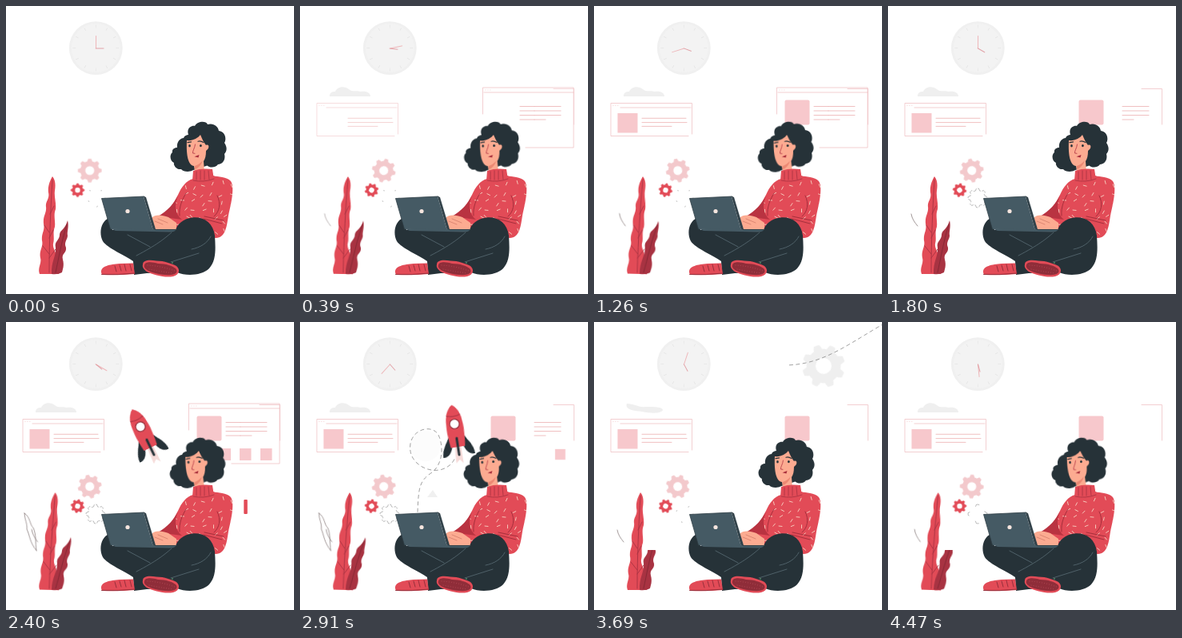
An HTML page that plays this animation: 360x360 px, repeating every 4500 ms.

```html
<!DOCTYPE html>
<html lang="en">
<head>
<meta charset="utf-8">
<title>Work in progress</title>
<style>
html, body { margin: 0; width: 100%; height: 100%; overflow: hidden; background: #fff; }
svg { display: block; width: 100vw; height: 100vh; }
:root { --red: #e24b57; --pink: #f7c8cc; --ink: #263238; --skin: #fcab91; --wine: #a83342; }
.anim { animation: 4500ms linear infinite; }
.line { fill: none; stroke-linecap: round; stroke-linejoin: round; }

/* clock */
.minute { animation-name: minute; }
.hour { animation-name: hour; }
.minute, .hour { transform-origin: 112.5px 53px; }
@keyframes minute { to { transform: rotate(900deg); } }
@keyframes hour { from { transform: rotate(90deg); } to { transform: rotate(165deg); } }

/* swaying parts share one beat */
.sway { animation-name: sway; animation-timing-function: cubic-bezier(.37, 0, .63, 1); }
@keyframes sway {
  0%, 40%, 80% { transform: rotate(0); }
  20%, 60%, 100% { transform: rotate(var(--tilt)); }
}
.head { --tilt: -3.4deg; transform-origin: 242px 208px; }
.tall { --tilt: 2.2deg; transform-origin: 56px 335px; }
.small { --tilt: 4.6deg; transform-origin: 64px 335px; }
.sketch { --tilt: 3.2deg; transform-origin: 45px 335px; }

.spin { animation-name: spin; }
.back { animation-direction: reverse; }
@keyframes spin { to { transform: rotate(360deg); } }

/* windows */
.enter { animation-name: enter; }
@keyframes enter { 0%, 3% { opacity: 0; } 11%, 100% { opacity: 1; } }
.thumb { animation-name: thumb; transform-box: fill-box; transform-origin: center; }
@keyframes thumb {
  0%, 10% { opacity: 0; transform: rotate(60deg) scale(.5); }
  16.7% { opacity: .16; transform: rotate(43deg) scale(.72); }
  27%, 100% { opacity: 1; transform: none; }
}
.step { animation-timing-function: step-end; }
.frame { animation-name: frame; }
@keyframes frame { 0% { opacity: 0; } 8% { opacity: 1; } 33% { opacity: 0; } 47% { opacity: 1; } 60%, 100% { opacity: 0; } }
.rest { animation-name: rest; }
@keyframes rest { 0% { opacity: 0; } 8% { opacity: 1; } 73%, 100% { opacity: 0; } }
.tile { animation-name: tile; transform-box: fill-box; transform-origin: center; }
.tile.last { animation-name: tileLast; }
@keyframes tile { 0%, 46% { transform: scale(0); } 52%, 60% { transform: none; } 63%, 100% { transform: scale(0); } }
@keyframes tileLast { 0%, 48% { transform: scale(0); } 53%, 64% { transform: none; } 70%, 100% { transform: scale(0); } }

/* short appearances */
.middle { animation-name: middle; }
@keyframes middle { 0% { opacity: 0; } 46% { opacity: 1; } 73%, 100% { opacity: 0; } }
.cog { animation-name: cog; }
@keyframes cog { 0%, 68% { opacity: 0; } 73%, 90% { opacity: 1; } 95%, 100% { opacity: 0; } }
.puff { animation-name: puff; }
@keyframes puff { 0%, 55% { opacity: 0; } 62%, 66% { opacity: 1; } 71%, 100% { opacity: 0; } }
.dot { animation-name: dot; }
@keyframes dot { 0% { opacity: 0; } 14% { opacity: 1; } 19%, 100% { opacity: 0; } }
.bar { animation-name: bar; }
@keyframes bar { 0% { opacity: 0; } 50.5% { opacity: 1; } 56%, 100% { opacity: 0; } }
.cloud { animation-name: cloud; }
@keyframes cloud { 0% { opacity: 0; } 7% { opacity: 1; } 78% { opacity: 0; } 86%, 100% { opacity: 1; } }
.wisp { animation-name: wisp; }
@keyframes wisp { 0% { opacity: 0; } 78% { opacity: 1; } 86%, 100% { opacity: 0; } }
.crop { animation-name: crop; }
@keyframes crop { 0% { transform: none; } 76%, 100% { transform: translateY(22px); } }
.ghost { animation-name: ghost; }
@keyframes ghost { 0% { stroke-dasharray: 1 18; } 36% { stroke-dasharray: 5 2.5; } 73% { stroke-dasharray: 1 24; } 92%, 100% { stroke-dasharray: 6 15; } }

/* rocket flight and its trail */
.rocket {
  offset-path: path("M147 238 C148 205 150 198 165 188 C178 178 180 157 173.4 142 C167 128 142 132 138 152 C134 176 160 190 178 184 C196 178 198.5 160 195.5 143 C188 100 195 55 240 54 C290 53 320 25 375 -5 L450 -45");
  offset-rotate: auto;
  animation-name: flight;
}
@keyframes flight {
  0%, 46% { offset-distance: 0px; }
  53.33% { offset-distance: 106px; }
  64.67% { offset-distance: 267px; }
  72% { offset-distance: 380px; }
  80%, 100% { offset-distance: 610px; }
}
.lift { animation-name: lift; }
@keyframes lift { 0%, 46% { transform: scale(0); } 51%, 80% { transform: none; } 80.1%, 100% { transform: scale(0); } }
.reveal { animation-name: reveal; }
@keyframes reveal {
  0%, 53.4% { stroke-dasharray: 0 2000; stroke-dashoffset: 0; }
  64.67% { stroke-dasharray: 235 2000; stroke-dashoffset: 0; }
  72% { stroke-dasharray: 190 2000; stroke-dashoffset: -158; }
  82% { stroke-dasharray: 230 2000; stroke-dashoffset: -382; }
  95%, 100% { stroke-dasharray: 0 2000; stroke-dashoffset: -640; }
}
</style>
</head>
<body>
<svg viewBox="0 0 360 360">
  <defs>
    <path id="route" d="M147 238 C148 205 150 198 165 188 C178 178 180 157 173.4 142 C167 128 142 132 138 152 C134 176 160 190 178 184 C196 178 198.5 160 195.5 143 C188 100 195 55 240 54 C290 53 320 25 375 -5 L450 -45"/>
    <mask id="flown" maskUnits="userSpaceOnUse" x="0" y="-60" width="460" height="420">
      <use href="#route" class="anim reveal" fill="none" stroke="#fff" stroke-width="6"/>
    </mask>
    <path id="knit" d="M234 216 C225 218 219 227 215 236 C209 248 202 257 194 264 L212 280 L262 290 C275 290 276 274 278 262 C282 245 286 226 281 219 C276 213 265 214 259 212 Z"/>
    <clipPath id="knitClip"><use href="#knit"/></clipPath>
    <clipPath id="leafClip"><rect class="anim step crop" x="40" y="263" width="70" height="90"/></clipPath>
  </defs>

  <g id="clock">
    <circle cx="112.3" cy="52.6" r="33.4" fill="#f0f0f0"/>
    <circle cx="112.3" cy="52.6" r="30.5" fill="#f3f3f3"/>
    <circle cx="112.3" cy="52.6" r="27" pathLength="120" fill="none" stroke="#e5e5e5" stroke-width="4" stroke-dasharray=".5 9.5" stroke-dashoffset=".25"/>
    <g class="line" stroke="#eda7ab" stroke-width=".8">
      <path class="anim minute" d="M112.5 53V37.5"/>
      <path class="anim hour" stroke="#dd8d93" d="M112.5 53V43.5"/>
    </g>
  </g>

  <g fill="#efefef">
    <path class="anim step cloud" d="M37 113 C37 108 40 107 44 107 C46 101 55 99 61 104 C66 108 70 105 76 107 C80 106 88 107 88 113 Z"/>
    <path class="anim step wisp" d="M41 102 C50 102 55 107 65 106 C74 106 86 106 86 110 C84 115 70 114 60 112 C50 111 38 110 41 102 Z"/>
  </g>

  <g class="anim enter">
    <g class="line" stroke="#f0c3c6" stroke-width=".8">
      <path d="M118 162.5H21V121.5H122.5V160"/>
      <path d="M33 127H121"/>
      <path stroke="#ecb0b2" d="M60 140.3H115M60 145.6H116M60 150.4H97"/>
      <path stroke-dasharray=".1 2.8" d="M24 124.5H30"/>
    </g>
    <rect class="anim thumb" x="29.5" y="134" width="25" height="24.5" fill="#f7c8cc"/>
  </g>

  <g class="line" stroke="#f0c3c6" stroke-width=".8">
    <g class="anim step frame">
      <path d="M228.5 135V102H342V177H282"/>
      <path d="M230 108H342"/>
      <path stroke-dasharray=".1 2.8" d="M232 105H238"/>
    </g>
    <path class="anim enter" d="M317 103.5H342.5V148"/>
    <g stroke="#ecb0b2">
      <path class="anim step frame" d="M275 125.5H293M275 131H293M275 136.5H293M275 142H293"/>
      <path class="anim step rest" d="M293 125.5H326M293 131H326M293 136.5H326M293 142H307"/>
    </g>
  </g>
  <g fill="#f7c8cc">
    <rect class="anim thumb" x="238.5" y="117.5" width="31" height="31" rx="2"/>
    <rect class="anim tile" x="266" y="158" width="15" height="15"/>
    <rect class="anim tile" x="292" y="158" width="14.5" height="15"/>
    <rect class="anim tile last" x="318" y="158" width="14.5" height="15"/>
  </g>

  <g class="anim cog"><g transform="translate(287 55)"><path class="anim spin" data-gear="27 10" fill="#efefef" fill-rule="evenodd"/></g></g>

  <g transform="translate(104.7 205.7)"><path class="anim spin back" data-gear="15 5.6" fill="#f3c9cc" fill-rule="evenodd"/></g>
  <g transform="translate(89.5 230.2)"><path class="anim spin" data-gear="8.7 3.2" fill="#e24b57" fill-rule="evenodd"/></g>
  <g transform="translate(112 240)"><path class="anim step ghost line" data-gear="12 0" stroke="#999" stroke-width=".7"/></g>

  <g class="anim puff">
    <circle cx="157" cy="155" r="19" fill="#fcfcfc"/>
    <path d="M159 219L166 210L172 219Z" fill="#f0f0f0"/>
  </g>
  <use href="#route" mask="url(#flown)" fill="none" stroke="#888" stroke-width=".8" stroke-dasharray="5 3.5"/>
  <g class="anim rocket"><g class="anim lift">
    <path d="M-16 -4L-37 -5L-33 0L-38 4L-16 4Z" fill="#f6dcda"/>
    <path d="M-2 -9C-12 -14 -17 -20 -28 -20C-29 -13 -22 -8 -15 -7ZM-2 9C-12 14 -17 20 -28 20C-29 13 -22 8 -15 7Z" fill="var(--ink)"/>
    <path d="M36 0C28 -12 8 -12 -17 -9V9C8 12 28 12 36 0Z" fill="var(--red)"/>
    <path class="line" d="M23 -8.5Q20 0 23 8.5" stroke="#a83342"/>
    <circle cx="12" r="6" fill="#fff" stroke="#8f2d39" stroke-width="1.1"/>
    <path class="line" d="M-6 0H-27" stroke="var(--ink)" stroke-width="3"/>
  </g></g>

  <circle class="anim step dot" cx="309.6" cy="229.3" r="2.7" fill="#e24b57"/>
  <rect class="anim step bar" x="297.3" y="222" width="4.5" height="18" rx="1" fill="#e24b57"/>

  <g class="line" stroke="#8a7d7d" stroke-width=".8">
    <g class="anim sway sketch">
      <path class="anim enter" d="M29 260C30 266 33 270 37 275"/>
      <path class="anim step middle" d="M19 240C20 250 23 251 23 260C27 268 27 276 36 286M19 240C27 245 26 254 31 258C35 266 34 276 36 286"/>
    </g>
  </g>
  <g class="anim sway tall">
    <path fill="var(--red)" d="M58 213C62 218 62 224 61 231C60 239 63 246 62 254C59 262 62 268 61 276C58 284 61 290 59 297C58 304 64 308 63 316C63 324 67 326 66 335H42C39 327 45 322 43 315C41 306 47 301 45 293C44 284 49 281 47 272C46 262 51 259 50 251C49 244 55 241 53 233C52 226 55 218 58 213Z"/>
    <path class="line" stroke="#a83342" stroke-width=".9" d="M58 217C56 250 54 290 54 333M55 260L60 250M54 290L59 280M54 283L48 274M54 315L62 304M54 310L46 300"/>
  </g>
  <g clip-path="url(#leafClip)">
    <g class="anim sway small">
      <path fill="#a83342" d="M57 335C56 320 63 312 62 302C60 294 67 293 67 286C68 279 73 281 77 268C79 276 76 282 77 287C77 292 72 295 75 302C76 309 69 309 71 317C73 324 71 329 70 333Q65 336 57 335Z"/>
      <path class="line" stroke="#7e2632" stroke-width=".8" d="M62 333C66 315 69 296 76 273"/>
    </g>
  </g>

  <g id="person">
    <use href="#knit" fill="var(--red)"/>
    <g id="flecks" class="line" clip-path="url(#knitClip)" stroke="#f8d5c5" stroke-width=".9"/>
    <path fill="#b93341" d="M215 237C210 249 211 260 220 267L190 263C202 256 209 248 215 237Z"/>
    <path class="line" stroke="#9f2c39" stroke-width=".9" d="M225 234C220 242 216 252 217 262M264 237C269 247 267 257 260 263M247 266L270 272M248 263L272 268"/>
    <path fill="var(--skin)" d="M182 265C186 260 195 261 203 264L213 271L213 281L185 280Z"/>
    <path class="line" stroke="#cf7866" stroke-width=".7" d="M186 269L196 273M190 266L202 271"/>

    <g class="anim sway head">
      <path fill="var(--ink)" d="M228 161C225 152 233 149 236 150C239 144 250 143 252 148C259 146 265 150 266 156C274 157 276 166 273 171C277 177 276 182 273 185C275 193 270 198 265 198C261 203 254 202 251.5 199.5L233 205.5C229 208 221 207 219 204C213 205 209 199 210 196C205 194 204 186 208 183C207 179 211 177 214 177C213 170 218 165 222 165C223 162 226 161 228 161Z"/>
      <path fill="var(--skin)" d="M226 168C233 169 240 165 243 161C245 166 247 170 250 174C254 172 255 178 250 181C250 187 249 191 247 194L248 207H236L235 200C228 199 225 188 226 168Z"/>
      <path fill="#ec8873" d="M236 200Q242 198 246 193Q243 202 236 204Z"/>
      <g fill="var(--ink)"><ellipse cx="229.5" cy="174.8" rx="1.3" ry="1.7"/><ellipse cx="243.4" cy="174.6" rx="1.4" ry="1.7"/></g>
      <path class="line" stroke="var(--ink)" stroke-width="1.2" d="M227 170.6L231.5 169.8M240 169.2Q243 168 247 170.5"/>
      <path class="line" stroke="#b8404b" stroke-width=".9" d="M236.5 173C236 178 233 181 233.5 184L236 184.3"/>
      <path fill="#a82f3c" d="M235.5 188.2L241.5 186L240.5 189.5Z"/>
    </g>
    <path fill="var(--red)" d="M234 206C242 203 251 203 258 204L260 217Q247 221 233 218Z"/>
    <path class="line" stroke="#a83342" stroke-width=".8" d="M238 207V217M243 206V217M248 206V217M253 206L254 217M234 218Q247 221 260 216"/>

    <path fill="var(--ink)" d="M129 265C118 269 116 285 121 294C127 303 148 311 159 319L160 336L176 334L214 333C225 338 245 337 254 328C263 318 262 303 261 287C259 271 247 263 233 264.5C221 266 214 273 212 280L133 280Z"/>
    <path class="line" stroke="#60747d" stroke-width=".7" d="M152 286L180 301M207 283C198 291 188 299 163 312M206 320L241 309M232 304C243 302 252 296 256 288"/>
    <circle cx="208" cy="321" r=".8" fill="#71b57e"/>

    <path fill="#455a64" d="M119.5 240.5L172 238L184 281L130.5 278.5Z"/>
    <path fill="#37474f" d="M172 238L175 239L187 279L184 281Z"/>
    <path fill="#455a64" d="M130 278L185 279H213Q211 282.5 205 282.5L137 281Z"/>
    <path class="line" stroke="#2f3e46" stroke-width=".8" d="M130.5 279L119.5 240.5L173 238L186 279.5H212"/>
    <circle cx="152" cy="256.5" r="2.6" fill="#f5e5de"/>

    <path fill="var(--red)" d="M119 333C118 325 130 323 142 322L159 321.5L161 335Q140 337 120 336Z"/>
    <path class="line" stroke="#8f2d39" stroke-width=".9" d="M119.5 335.5Q140 336.5 161 334M136 325L138 332M142 324L144 331M148 323L150 331M155 323L157 331"/>
    <path fill="var(--red)" d="M171 323C171 317 180 317 188 318.5C198 318.5 207 322 213 325C218 329 217 336 209 338C198 340 184 336 176 332C172 329 170 326 171 323Z"/>
    <path fill="#8f2d39" d="M173 324C174 319 183 320 190 322C200 322 208 325 212 328C216 332 212 336 206 336C197 337 184 334 178 331C174 329 172 326 173 324Z"/>
    <path class="line" stroke="#c25a64" stroke-width=".7" stroke-dasharray=".1 3" d="M177 324Q194 325 211 331M179 329Q194 332 209 334"/>
  </g>
</svg>
<script>
const TAU = Math.PI * 2;

// Ring of eight rounded teeth, with an optional hole.
function gear(radius, hole) {
  const steps = 96;
  let d = "";
  for (let i = 0; i < steps; i++) {
    const a = i / steps * TAU;
    const tooth = Math.max(-1, Math.min(1, 2.2 * Math.cos(8 * a)));
    const r = radius * (.89 + .1 * tooth);
    d += (i ? "L" : "M") + (r * Math.cos(a)).toFixed(2) + " " + (r * Math.sin(a)).toFixed(2);
  }
  d += "Z";
  if (hole) d += `M${hole} 0A${hole} ${hole} 0 1 0 ${-hole} 0A${hole} ${hole} 0 1 0 ${hole} 0Z`;
  return d;
}

for (const el of document.querySelectorAll("[data-gear]")) {
  el.setAttribute("d", gear(...el.dataset.gear.split(" ").map(Number)));
}

let seed = 7;
const random = () => (seed = seed * 16807 % 2147483647) / 2147483647;

let flecks = "";
for (let y = 222; y < 288; y += 10) {
  for (let x = 208; x < 284; x += 12) {
    const a = random() * TAU;
    const px = x + random() * 6, py = y + random() * 5;
    flecks += `M${px} ${py}l${4 * Math.cos(a)} ${4 * Math.sin(a)}`;
  }
}
const path = document.createElementNS("http://www.w3.org/2000/svg", "path");
path.setAttribute("d", flecks);
document.getElementById("flecks").append(path);
</script>
</body>
</html>
```
